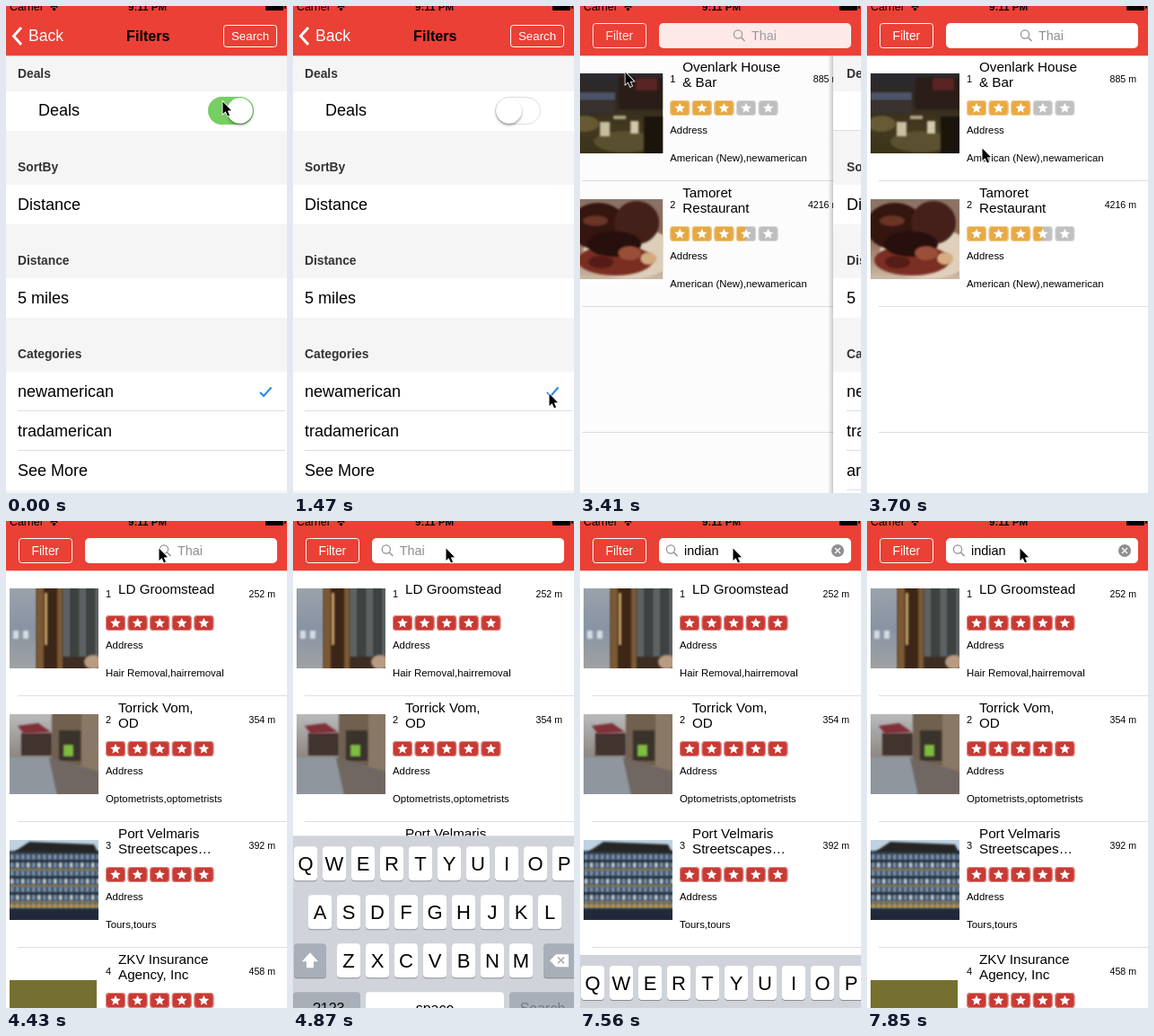
Write an HTML page with a canvas that moves like this. It is 313x542 px and loops after 8000 ms.

```html
<!DOCTYPE html>
<html lang="en">
<head>
<meta charset="utf-8">
<title>Search filters</title>
<style>
html, body { margin: 0; width: 100%; height: 100%; overflow: hidden; background: #fff; }
canvas { display: block; width: 313px; height: 542px; }
</style>
</head>
<body>
<canvas id="stage"></canvas>
<script>
const W = 313, H = 542, LOOP = 8000, TICK = 147.9, LAST_TICK = 53;
const RED = '#eb4036', LINE = '#dedee1', GRAY = '#8e8e93';
const canvas = document.getElementById('stage');
const ratio = window.devicePixelRatio || 1;
canvas.width = W * ratio;
canvas.height = H * ratio;
const c = canvas.getContext('2d');
c.scale(ratio, ratio);

// Drawing helpers
function box(color, x, y, w, h, r = 0) {
  c.fillStyle = color;
  c.beginPath();
  c.roundRect(x, y, w, h, r);
  c.fill();
}

function outline(color, x, y, w, h, r) {
  c.strokeStyle = color;
  c.lineWidth = 1;
  c.beginPath();
  c.roundRect(x, y, w, h, r);
  c.stroke();
}

function text(str, x, y, size, color = '#000', { bold = false, align = 'left' } = {}) {
  c.font = `${bold ? 'bold ' : ''}${size}px "Liberation Sans", Arial, sans-serif`;
  c.textAlign = align;
  c.fillStyle = color;
  c.fillText(str, x, y);
}

function path(points, close = false) {
  c.beginPath();
  points.forEach(([x, y]) => c.lineTo(x, y));
  if (close) c.closePath();
}

function polygon(color, points) {
  c.fillStyle = color;
  path(points, true);
  c.fill();
}

function stroke(color, width, points) {
  c.strokeStyle = color;
  c.lineWidth = width;
  path(points);
  c.stroke();
}

function disc(color, x, y, rx, ry = rx) {
  c.fillStyle = color;
  c.beginPath();
  c.ellipse(x, y, rx, ry, 0, 0, 7);
  c.fill();
}

function layer(dx, dy, alpha, draw) {
  if (alpha <= 0) return;
  c.save();
  c.translate(dx, dy);
  c.globalAlpha *= alpha;
  draw();
  c.restore();
}

function shade(x0, y0, x1, y1, ...colors) {
  const g = c.createLinearGradient(x0, y0, x1, y1);
  colors.forEach((color, i) => g.addColorStop(i / (colors.length - 1), color));
  return g;
}

// Motion
const clamp = v => Math.max(0, Math.min(1, v));
const easeOut = v => 1 - (1 - clamp(v)) ** 3;
const spring = v => v <= 0 ? 0 : 1 - (1 + v) * Math.exp(-v);

const POINTER = [
  [0, 241, 106], [1, 237, 111], [5, 237, 111], [7, 290, 200], [8.5, 301, 330],
  [10, 285, 431], [13, 285, 431], [15, 9, 59], [16, 9, 59], [17, 10, 60],
  [18, 10, 60], [19, 11, 31], [22, 11, 31], [25, 128, 158], [30, 170, 30]
];

function pointerAt(tick) {
  const next = POINTER.findIndex(k => k[0] > tick);
  if (next < 0) return POINTER.at(-1).slice(1);
  const a = POINTER[next - 1], b = POINTER[next];
  const p = (tick - a[0]) / (b[0] - a[0]);
  return [a[1] + (b[1] - a[1]) * p, a[2] + (b[2] - a[2]) * p];
}

const TYPED = [[42, 1], [43, 2], [45, 3], [46, 4], [49, 6]];
function queryAt(tick) {
  const reached = TYPED.filter(([at]) => at <= tick).at(-1);
  return reached ? 'indian'.slice(0, reached[1]) : '';
}

// Photos, drawn softly in a 99 by 89 area
const backdrop = color => box(color, -8, -8, 115, 105);

const photos = {
  dining() {
    backdrop(shade(0, 0, 0, 89, '#2c2b33', '#2f271f', '#443a20', '#3a3319'));
    box('#4d5468', 0, 21, 46, 9);
    box('#39322e', 0, 31, 46, 14);
    box('#2b1d18', 50, 4, 49, 36);
    box('#5a2424', 69, 5, 24, 14);
    disc('#665b35', 12, 56, 16, 9);
    disc('#5b5130', 56, 76, 34, 12);
    box('#c9c0a2', 29, 54, 11, 16);
    box('#d2c9ab', 63, 53, 9, 14);
    box('#b0a583', 44, 47, 14, 4);
    box('#1a140d', 78, 48, 25, 45);
  },
  roast() {
    backdrop(shade(0, 0, 0, 89, '#8c7468', '#8f6c58', '#cdbba8'));
    disc('#dfd0bd', 62, 60, 52, 29);
    disc('#7b2f22', 46, 68, 42, 17);
    disc('#35150f', 27, 30, 32, 26);
    disc('#45201a', 70, 26, 25, 24);
    disc('#6b3526', 24, 24, 14, 6);
    disc('#260f0d', 45, 50, 30, 14);
    disc('#9a4f38', 62, 60, 13, 8);
    disc('#561c17', 30, 70, 14, 7);
    disc('#d4ac80', 83, 66, 9, 7);
  },
  doorway() {
    backdrop('#3d2d22');
    box(shade(0, 0, 0, 89, '#9ba3aa', '#8794a4', '#a0a2a3'), -8, -8, 38, 105);
    box('#d4dce2', 4, 47, 6, 9);
    box('#d4dce2', 15, 47, 6, 9);
    box('#7c5935', 30, -8, 29, 105);
    box('#3c2617', 38, -8, 15, 105);
    box('#c9a669', 39, 5, 3, 58);
    for (let i = 0; i < 5; i++) box(i % 2 ? '#3d4242' : '#5c6263', 59 + i * 9, -8, 9, 84);
    disc('#b79b83', 93, 82, 10, 8);
  },
  street() {
    backdrop(shade(0, 0, 0, 89, '#b9bbbb', '#8f8a86', '#77777a'));
    box('#71604f', 47, -8, 60, 66);
    box('#8a7866', 80, -8, 27, 74);
    box('#41332e', 13, 21, 34, 25);
    polygon('#80303a', [[9, 13], [32, 10], [46, 20], [16, 22]]);
    box('#3a332c', 55, 18, 24, 34);
    box('#7fbb40', 60, 34, 11, 13);
    polygon('#8f969e', [[-8, 48], [44, 48], [55, 97], [-8, 97]]);
    polygon('#706763', [[44, 48], [107, 66], [107, 97], [55, 97]]);
  },
  facade() {
    backdrop('#39485c');
    box('#bfd2e1', -8, -8, 115, 20);
    polygon('#262525', [[4, 14], [22, 2], [94, 5], [99, 15]]);
    for (let y = 16; y < 78; y += 9) {
      for (let x = 1; x < 99; x += 6) box((x + y) % 4 ? '#7c95af' : '#c3cdd3', x, y, 3.5, 6);
      box(y % 2 ? '#a18350' : '#1f252e', 0, y + 7, 99, 2);
    }
    box('#20283a', -8, 78, 115, 19);
    box('#b98f35', 0, 72, 99, 3);
  },
  badge() {
    box('#75702f', 0, 16, 97, 97);
  }
};

const CATEGORY_RESULTS = [
  { title: ['Ovenlark House', '& Bar'], away: '885 m', tags: 'American (New),newamerican', stars: 3, color: '#e9aa43', photo: 'dining' },
  { title: ['Tamoret', 'Restaurant'], away: '4216 m', tags: 'American (New),newamerican', stars: 3.5, color: '#e9aa43', photo: 'roast' }
];
const ALL_RESULTS = [
  { title: ['LD Groomstead'], away: '252 m', tags: 'Hair Removal,hairremoval', photo: 'doorway' },
  { title: ['Torrick Vom,', 'OD'], away: '354 m', tags: 'Optometrists,optometrists', photo: 'street' },
  { title: ['Port Velmaris', 'Streetscapes…'], away: '392 m', tags: 'Tours,tours', photo: 'facade' },
  { title: ['ZKV Insurance', 'Agency, Inc'], away: '458 m', tags: 'Insurance,insurance', photo: 'badge' }
].map(item => ({ ...item, stars: 5, color: '#c93a34' }));

function rating(x, y, count, color) {
  for (let i = 0; i < 5; i++) {
    const left = x + i * 24.6, filled = clamp(count - i);
    box('#c0c0c0', left, y, 22, 17, 4);
    if (filled) box(color, left, y, 22 * filled, 17, 4);
    outline('rgba(255,255,255,.4)', left + 0.5, y + 0.5, 21, 16, 3.5);
    polygon('#fff', Array.from({ length: 10 }, (_, k) => {
      const r = k % 2 ? 2.8 : 6, a = k * Math.PI / 5 - Math.PI / 2;
      return [left + 11 + r * Math.cos(a), y + 8.8 + r * Math.sin(a)];
    }));
  }
}

function resultRow(item, index) {
  const isBadge = item.photo === 'badge';
  layer(4, 20, 1, () => {
    c.beginPath();
    c.rect(0, 0, 99, isBadge ? 120 : 89);
    c.clip();
    if (!isBadge) c.filter = 'blur(1px)';
    photos[item.photo]();
  });
  text(index + 1, 111, 29.5, 11);
  const top = item.title.length > 1 ? 17.5 : 26;
  item.title.forEach((line, i) => text(line, 125, top + i * 17, 15.2));
  text(item.away, 300, 30, 10.6, '#000', { align: 'right' });
  rating(111, 50, item.stars, item.color);
  text('Address', 111, 87, 11.4);
  text(item.tags, 111, 118, 11.4);
}

function resultList(items) {
  box('#fff', -2, 0, 330, H);
  items.forEach((item, i) => layer(0, 55 + i * 140, 1, () => resultRow(item, i)));
  for (let y = 194; y < H; y += 140) box(LINE, 13, y, 307, 1);
}

function toggle(on) {
  box('#fff', 225, 101, 51, 31, 15.5);
  outline('#dfdfdf', 225.5, 101.5, 50, 30, 15);
  layer(0, 0, on, () => box('#77ce63', 225, 101, 51, 31, 15.5));
  c.save();
  c.shadowColor = 'rgba(0,0,0,.35)';
  c.shadowBlur = 3;
  c.shadowOffsetY = 2;
  disc('#fff', 240.5 + 20 * on, 116.5, 14.3);
  c.restore();
}

function filterPage(tick) {
  const expanded = tick >= 11;
  box('#f5f5f5', -2, 55, 320, H);
  ['Deals', 'SortBy', 'Distance', 'Categories'].forEach((name, i) => {
    text(name, 13, 80 + i * 104, 13.8, '#333', { bold: true });
    box('#fff', -2, 95 + i * 104, 320, i < 3 ? 44 : expanded ? 200 : 132);
  });
  text('Deals', 36, 122, 18);
  text('Distance', 13, 227, 18);
  text('5 miles', 13, 331, 18);
  ['newamerican', 'tradamerican', expanded ? 'argentine' : 'See More'].forEach((name, i) => {
    text(name, 13, 435 + i * 44, 18);
    if (i < 2 || expanded) box(LINE, 13, 450 + i * 44, 298, 1);
  });
  if (expanded) box(LINE, -2, 138, 313, 1);
  else stroke('#2289ec', 2, [[283, 430], [287, 434], [295.5, 424.5]]);
  toggle(1 - easeOut((tick - 2) / 3));
}

function statusBar() {
  text('Carrier', 4, 5, 12.4);
  text('9:11 PM', 136, 5, 11.6, '#000', { bold: true });
  disc('#000', 53.5, 3.5, 1.7);
  c.strokeStyle = '#000';
  c.lineWidth = 1.5;
  c.beginPath();
  c.arc(53.5, 5, 5, -2.4, -0.74);
  c.stroke();
  box('#000', 289, -4, 20, 9, 1);
  box('#000', 310, -1, 2, 4, 1);
}

function searchField(query, active) {
  const move = (1 - active) * 75;
  box('#fff', 88, 19, 214, 28, 5);
  layer(move, 0, 1, () => {
    c.strokeStyle = GRAY;
    c.lineWidth = 1.2;
    c.beginPath();
    c.arc(101, 31.5, 4.6, 0, 7);
    c.stroke();
    stroke(GRAY, 1.4, [[104.5, 35], [108.5, 39]]);
    text(query || 'Thai', 116, 38, 14.4, query ? '#000' : GRAY);
  });
  if (!query) return;
  disc(GRAY, 287, 33, 7);
  stroke('#fff', 1.2, [[284, 30], [290, 36]]);
  stroke('#fff', 1.2, [[290, 30], [284, 36]]);
}

function navBar(tick, pop, active) {
  box(RED, 0, 0, W, 55);
  box('rgba(235,64,54,.35)', 0, 55, W, 1);
  statusBar();
  layer(0, 0, pop, () => {
    outline('#fff', 14.5, 19.5, 59, 27, 3);
    text('Filter', 28.5, 37.5, 13.8, '#fff');
    searchField(queryAt(tick), active);
  });
  layer(pop * 210, 0, 1 - pop, () => {
    text('Back', 25, 39, 17.5, '#fff');
    text('Filters', 134, 39, 16.2, '#000', { bold: true });
  });
  layer(0, 0, pop ? 0.15 * (1 - pop) : 1, () => stroke('#fff', 3, [[17, 24], [8.5, 33.5], [17, 43]]));
  layer(0, 0, pop ? 0.88 * (1 - pop) : 1, () => {
    outline('#fff', 242.5, 21.5, 59, 24, 3);
    text('Search', 251, 38, 13.3, '#fff');
  });
}

function key(x, y, w, label, size = 22, color = '#fff', ink = '#000') {
  box('#898c91', x, y + 1, w, 38, 4);
  box(color, x, y, w, 38, 4);
  text(label, x + w / 2, y + (size > 20 ? 27 : 24), size, ink, { align: 'center' });
}

function keyboard(canSearch) {
  const dark = '#a8afb9';
  box('#d0d4da', 0, 343, W, 199);
  [['QWERTYUIOP', 1], ['ASDFGHJKL', 17], ['ZXCVBNM', 49]].forEach(([letters, x], row) =>
    [...letters].forEach((letter, i) => key(x + i * 32, 355 + row * 54, 26, letter)));
  key(1, 463, 36, '', 22, dark);
  key(279, 463, 36, '', 22, dark);
  polygon('#fff', [[19, 473], [28, 483], [23, 483], [23, 490], [15, 490], [15, 483], [10, 483]]);
  polygon('#fff', [[286, 482], [293, 475], [307, 475], [307, 489], [293, 489]]);
  stroke(dark, 1.5, [[295, 478], [302, 485]]);
  stroke(dark, 1.5, [[302, 478], [295, 485]]);
  key(0, 517, 75, '.?123', 16, dark);
  key(81, 517, 154, 'space', 16);
  key(241, 517, 74, 'Search', 16, canSearch ? '#1a7ff4' : dark, canSearch ? '#fff' : '#737a84');
}

function pointer(x, y) {
  layer(x, y, 1, () => {
    path([[0.5, 0.5], [0.5, 14], [3.6, 11.3], [6, 16.5], [8, 15.6], [5.8, 10.6], [10, 10.3]], true);
    c.strokeStyle = '#fff';
    c.lineWidth = 1.6;
    c.stroke();
    c.fillStyle = '#000';
    c.fill();
  });
}

function draw(tick) {
  const pop = tick >= 25 ? 1 : spring((tick - 20.92) * 1.8);
  const active = easeOut((tick - 31) / 3);
  const raised = active - easeOut((tick - 50) / 3);

  if (pop) layer(-96 * (1 - pop), 0, 1, () => resultList(tick < 28 ? CATEGORY_RESULTS : ALL_RESULTS));
  if (pop < 1) {
    box(`rgba(0,0,0,${0.1 * (1 - pop)})`, 0, 0, W, H);
    layer(320 * pop, 0, 1, () => {
      if (pop) box(shade(-8, 0, -2, 0, 'rgba(0,0,0,0)', 'rgba(0,0,0,.2)'), -8, 55, 6, H);
      filterPage(tick);
    });
  }
  navBar(tick, pop, active);
  if (raised > 0) layer(0, 199 * (1 - raised), 1, () => keyboard(tick >= 42));
  pointer(...pointerAt(tick));
}

let shown = -1;
const start = performance.now();
function frame() {
  const time = (performance.now() - start) % LOOP;
  const tick = Math.min(LAST_TICK, Math.floor((time + 10) / TICK));
  if (tick !== shown) draw(shown = tick);
  requestAnimationFrame(frame);
}
frame();
</script>
</body>
</html>
```
